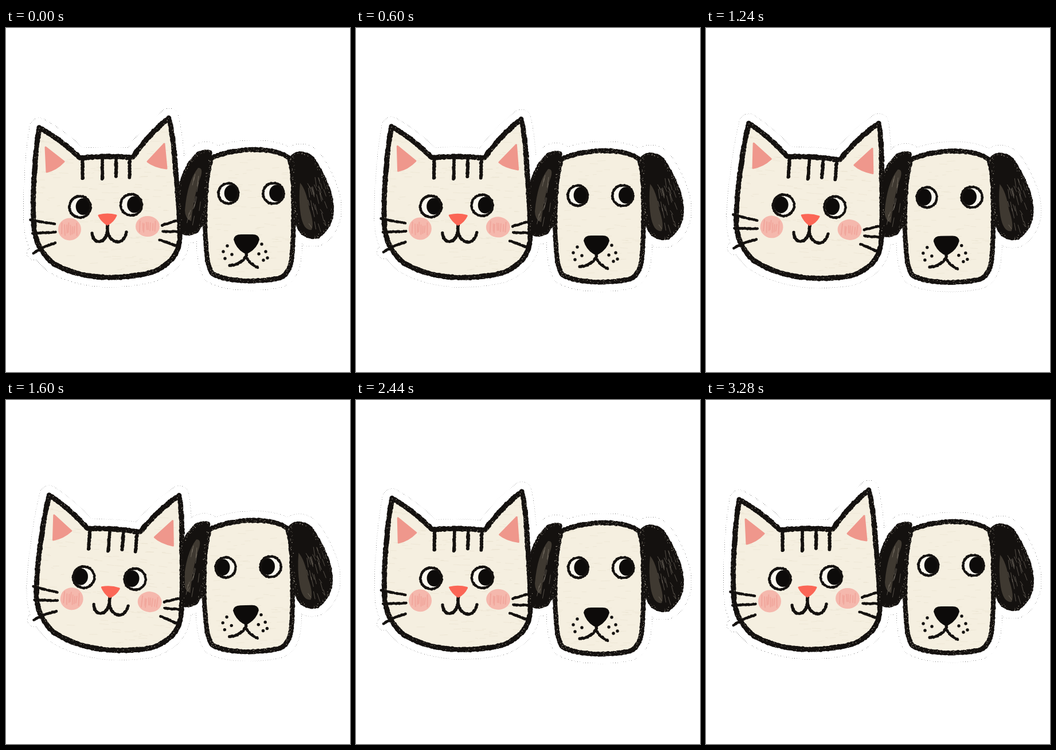
Animation of 600x600 px, one loop 3.32 s. Source, as an HTML page with a canvas:

```html
<!DOCTYPE html>
<html lang="en">
<head>
<meta charset="utf-8">
<title>Cat and dog</title>
<style>
html, body { margin: 0; width: 100%; height: 100%; overflow: hidden; background: #fff; }
canvas { display: block; width: 600px; height: 600px; }
</style>
</head>
<body>
<canvas id="stage" width="600" height="600"></canvas>
<script>
const ctx = document.getElementById('stage').getContext('2d');
const LOOP = 3320, STEP = 40;
const INK = '#14110f', CREAM = '#f5efe0', PINK = '#ef978c';

let seed = 7;
const rnd = () => (seed = (seed * 16807) % 2147483647) / 2147483647;
const spread = n => (rnd() - 0.5) * 2 * n;

function dot(path, x, y, r) {
  path.moveTo(x + r, y);
  path.arc(x, y, r, 0, Math.PI * 2);
}

// Crayon stroke: overlapping uneven blobs along a path, with optional pale grain.
function crayon(d, width, grain = 0) {
  const el = document.createElementNS('http://www.w3.org/2000/svg', 'path');
  el.setAttribute('d', d);
  const ink = new Path2D(), specks = new Path2D(), len = el.getTotalLength();
  for (let s = 0; s <= len; s += 1.5) {
    const p = el.getPointAtLength(s);
    dot(ink, p.x + spread(0.5), p.y + spread(0.5), width / 2 * (0.93 + spread(0.13)));
    if (rnd() < grain) dot(specks, p.x + spread(width * 0.4), p.y + spread(width * 0.4), 0.3 + rnd() * 0.5);
  }
  return { ink, specks };
}

function drawCrayon(c) {
  ctx.fillStyle = INK;
  ctx.fill(c.ink);
  ctx.fillStyle = 'rgba(225,216,198,.75)';
  ctx.fill(c.specks);
}

function fillPath(p, color) {
  ctx.fillStyle = color;
  ctx.fill(p);
}

function strokePath(p, color, width) {
  ctx.strokeStyle = color;
  ctx.lineWidth = width;
  ctx.stroke(p);
}

function oval(x, y, rx, ry, color) {
  ctx.fillStyle = color;
  ctx.beginPath();
  ctx.ellipse(x, y, rx, ry, 0, 0, Math.PI * 2);
  ctx.fill();
}

// Faint horizontal paper fibres inside a box.
function fibres(x, y, w, h, n) {
  const p = new Path2D();
  for (let i = 0; i < n; i++) {
    const a = x + rnd() * w, b = y + rnd() * h;
    p.moveTo(a, b);
    p.lineTo(a + 4 + rnd() * 12, b + spread(1));
  }
  return p;
}

function paper(shape, marks) {
  fillPath(shape, CREAM);
  ctx.save();
  ctx.clip(shape);
  strokePath(marks, 'rgba(214,203,178,.3)', 0.8);
  ctx.restore();
}

const catD = 'M58 174 Q95 194 129 227 Q175 222 221 226 Q247 187 284 157 Q291 185 294 225 L301 310 Q305 360 302 376 Q296 409 255 426 Q215 436 172 435 Q120 432 85 412 Q55 390 49 352 Q46 310 49 265 Q51 215 58 174 Z';
const catBody = new Path2D(catD);
const catPaper = fibres(40, 170, 265, 265, 230);
const whiskerD = 'M42 335 L86 342 M46 358 L88 356 M48 393 Q66 380 87 375 M272 344 L301 335 M273 355 L302 355 M267 369 L303 382';
const whiskers = new Path2D(whiskerD);
const catLines = [
  crayon(catD, 9.2, 0.3),
  crayon('M133.5 228 L133.5 263 M168 229 L168 263 M192 226 L192 259 M215.5 228 L215.5 261', 6.2),
  crayon(whiskerD, 5),
  crayon('M177 343 L177 354 M150 357 C151 378 174 378 177 354 C181 378 207 380 210 355', 5.6)
];
const catEars = new Path2D('M69 208 L101 233 Q88 247 71 251 Z M276 202 L280 245 Q258 242 247 233 Z');
const catNose = new Path2D('M162 327 Q177 323 192 327 Q187 338 177 343 Q167 337 162 327 Z');

function cheekMarks(x, y) {
  const p = new Path2D();
  for (let i = 0; i < 8; i++) {
    const a = x - 13 + i * 3.7 + spread(1);
    p.moveTo(a, y - 8 + spread(4));
    p.lineTo(a + spread(1), y + 8 + spread(4));
  }
  return p;
}
const cheeks = [cheekMarks(111, 351), cheekMarks(247, 346)];

const dogD = 'M358 227 Q390 213 430 212 Q472 212 493 226 Q500 238 501 285 Q503 345 499 395 Q497 427 478 436 Q450 442 420 441 Q380 440 361 429 Q351 420 349 380 Q345 330 349 285 Q351 250 358 227 Z';
const dogBody = new Path2D(dogD);
const dogPaper = fibres(345, 212, 158, 230, 130);
const earLD = 'M357 217 Q341 210 326 229 Q307 252 302 290 Q299 335 305 354 Q317 364 333 354 Q346 338 349 295 Q351 258 357 217 Z';
const earRD = 'M500 224 Q514 212 533 226 Q549 247 560 275 Q571 302 568 327 Q562 353 543 364 Q526 368 514 354 Q505 338 503 300 Q501 260 500 224 Z';
const earShapes = [new Path2D(earLD), new Path2D(earRD)];
const earLines = [crayon(earLD, 6.5, 0.6), crayon(earRD, 6.5, 0.6)];
const earPatches = new Path2D('M335 244 Q344 243 340 258 Q328 290 323 337 Q312 332 312 318 Q316 268 335 244 Z M513 270 Q524 283 529 315 Q538 342 533 352 Q519 354 514 326 Q510 300 513 270 Z');
const earStreaks = new Path2D();
for (let i = 0; i < 32; i++) {
  const x = 526 + rnd() * 30, y = 258 + rnd() * 84;
  earStreaks.moveTo(x, y);
  earStreaks.lineTo(x + 2 + rnd() * 3, y + 5 + rnd() * 12);
}
for (let i = 0; i < 14; i++) {
  const x = 318 + rnd() * 24, y = 245 + rnd() * 85;
  earStreaks.moveTo(x, y);
  earStreaks.lineTo(x - 2 - rnd() * 2, y + 6 + rnd() * 12);
}
const dogLines = [
  crayon(dogD, 8.6, 0.6),
  crayon('M419 390 L419 399 M389 414 Q408 414 418 399 Q427 413 440 418', 5.2)
];
const dogNose = new Path2D('M397 369 Q398 360 410 360 L430 360 Q441 360 442 369 Q438 384 424 392 Q419 395 414 392 Q401 384 397 369 Z');
const freckles = new Path2D();
[[379, 390], [386, 380], [382, 402], [394, 395], [446, 377], [441, 394], [453, 390], [456, 401], [449, 405]]
  .forEach(([x, y]) => dot(freckles, x, y, 2.7));

const ring = (x, y, r) => crayon(`M${x - r} ${y} A${r} ${r} 0 1 1 ${x + r} ${y} A${r} ${r} 0 1 1 ${x - r} ${y}`, 4.8);
const eye = (x, y, r) => ({ x, y, r, line: ring(x, y, r) });
const catEyes = [eye(129, 312, 18.5), eye(218.5, 308.5, 18.5)];
const dogEyes = [eye(388, 288.5, 17.5), eye(466.5, 288.5, 18)];

function drawEye(e, look) {
  oval(e.x, e.y, e.r, e.r, '#faf7ee');
  oval(e.x + look * 5.2, e.y - 0.5, 12.5, 14.5, '#0d0b0a');
  drawCrayon(e.line);
}

function drawCat(look) {
  paper(catBody, catPaper);
  fillPath(catEars, PINK);
  strokePath(catEars, PINK, 3);
  oval(111, 351, 20, 19.5, '#f5b8ad');
  oval(247, 346, 21, 18, '#f5b8ad');
  cheeks.forEach(p => strokePath(p, 'rgba(236,140,130,.4)', 2));
  catLines.forEach(drawCrayon);
  fillPath(catNose, '#fb6656');
  strokePath(catNose, '#fb6656', 3);
  catEyes.forEach(e => drawEye(e, look));
}

function drawDog(look, ex, ey) {
  earShapes.forEach(p => fillPath(p, INK));
  fillPath(earPatches, '#3f3931');
  strokePath(earStreaks, 'rgba(165,156,142,.5)', 0.9);
  earLines.forEach(drawCrayon);
  paper(dogBody, dogPaper);
  dogLines.forEach(drawCrayon);
  fillPath(dogNose, '#0d0b0a');
  fillPath(freckles, INK);
  ctx.save();
  ctx.translate(ex, ey);
  dogEyes.forEach(e => drawEye(e, look));
  ctx.restore();
}

// Dotted rim of the sticker.
const tile = document.createElement('canvas');
tile.width = tile.height = 4;
const tc = tile.getContext('2d');
tc.fillStyle = 'rgba(0,0,0,.6)';
tc.fillRect(0, 0, 1, 1);
tc.fillRect(2, 2, 1, 1);
const dots = ctx.createPattern(tile, 'repeat');

// Eased value from [time, value] pairs.
function track(keys, t) {
  let i = 1;
  while (i < keys.length - 1 && t > keys[i][0]) i++;
  const [t0, a] = keys[i - 1], [t1, b] = keys[i];
  const u = Math.min(1, Math.max(0, (t - t0) / (t1 - t0)));
  return a + (b - a) * (1 - Math.cos(Math.PI * u)) / 2;
}

const catTilt = [[0, 0], [480, 0], [840, 4], [1600, 4.4], [1960, 5.3], [2140, 4.7], [2600, 0], [LOOP, 0]];
const dogDrop = [[0, 0], [360, 1], [840, 3], [1160, 3], [1600, -2], [1960, 3], [2140, 4.5], [2440, 2], [2840, 1], [LOOP, 0]];
const dogTilt = [[0, 0], [600, 0], [840, -0.1], [1200, -0.2], [1600, -0.9], [1960, -0.1], [2240, 0], [LOOP, 0]];
const eyeX = [[0, 0], [360, -0.5], [840, -1.7], [1600, -2.5], [1960, -1.8], [2440, -0.3], [LOOP, 0]];
const eyeY = [[0, 0], [360, 0.5], [840, 3.2], [1600, 5], [1960, 3.3], [2440, 2], [LOOP, 0]];
const gaze = [[0, 1], [980, 1], [1300, -1], [2060, -1], [2340, 1], [LOOP, 1]];

function inCat(t, paint) {
  ctx.save();
  ctx.translate(169, 397);
  ctx.rotate(track(catTilt, t) * Math.PI / 180);
  ctx.translate(-169, -397);
  paint();
  ctx.restore();
}

function inDog(t, paint) {
  ctx.save();
  ctx.translate(420, 440 + track(dogDrop, t));
  ctx.rotate(track(dogTilt, t) * Math.PI / 180);
  ctx.translate(-420, -440);
  paint();
  ctx.restore();
}

function halo(t, color, trim) {
  inDog(t, () => [dogBody, ...earShapes].forEach(p => strokePath(p, color, 34 - trim)));
  inCat(t, () => {
    strokePath(catBody, color, 35 - trim);
    strokePath(whiskers, color, 24 - trim);
  });
}

function draw(t) {
  ctx.fillStyle = '#fff';
  ctx.fillRect(0, 0, 600, 600);
  ctx.lineJoin = ctx.lineCap = 'round';
  halo(t, dots, 0);
  halo(t, '#fff', 2);
  const look = track(gaze, t);
  inDog(t, () => drawDog(look, track(eyeX, t), track(eyeY, t)));
  inCat(t, () => drawCat(look));
}

const start = performance.now();
function tick() {
  const t = (performance.now() - start) % LOOP;
  draw(Math.floor(t / STEP) * STEP);
  requestAnimationFrame(tick);
}
tick();
</script>
</body>
</html>
```
